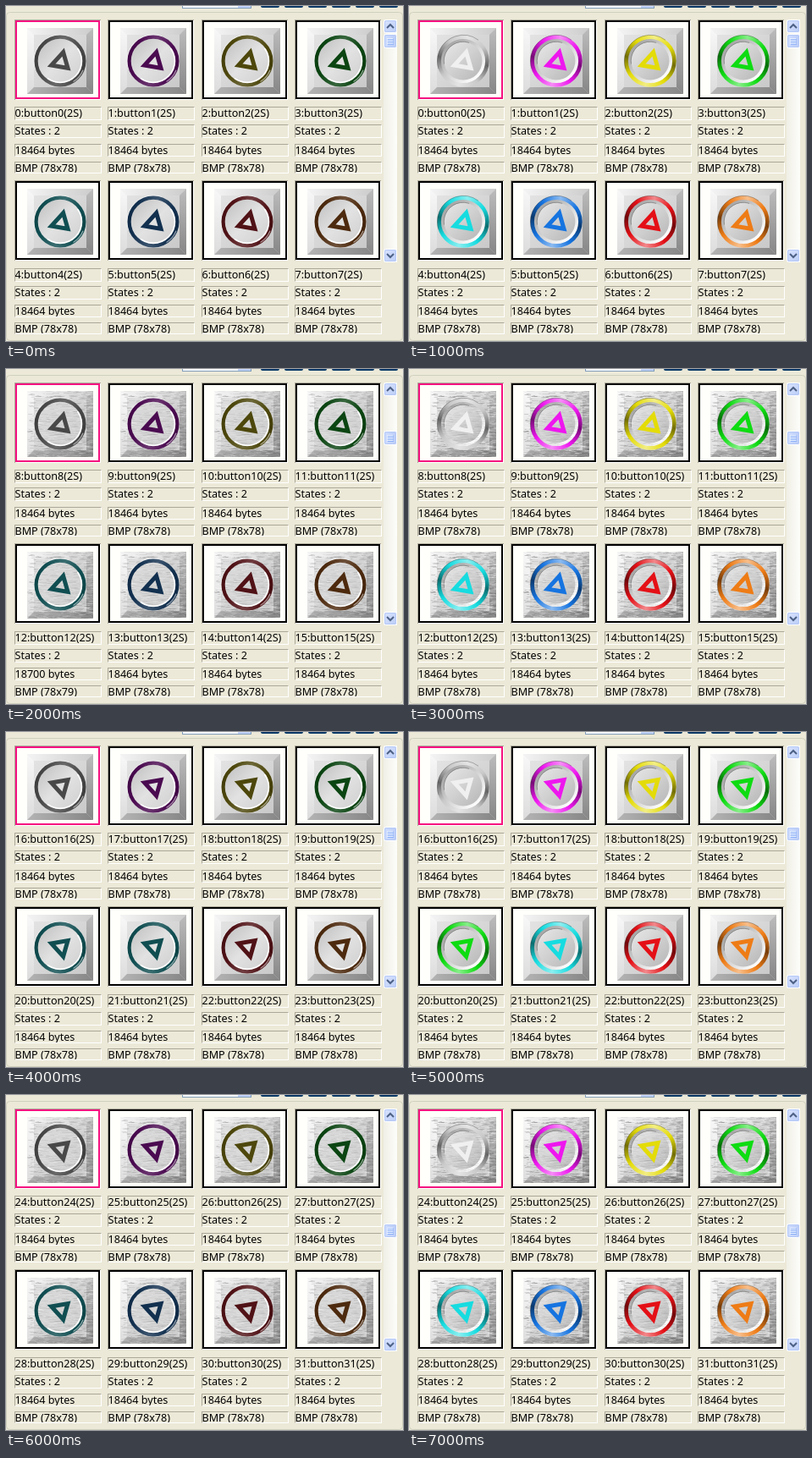
Animation, 469 px wide and 396 px high, one loop 8000 ms. Source, as an HTML page with a canvas:

```html
<!DOCTYPE html>
<html lang="en">
<head>
<meta charset="utf-8">
<title>Button list</title>
<style>
html, body { margin: 0; width: 100%; height: 100%; overflow: hidden; background: #ece9d8; }
#stage { position: relative; width: 469px; height: 396px; overflow: hidden; }
canvas { position: absolute; left: 0; top: 0; }
.label {
  position: absolute; box-sizing: border-box; width: 103px; overflow: hidden;
  border: 1px solid; border-color: #aca899 #fff #fff #aca899;
  font: 12.6px/14px "Noto Sans", "Open Sans", sans-serif;
  color: #000; white-space: pre; text-indent: -0.5px;
}
</style>
</head>
<body>
<div id="stage"><canvas id="view" width="469" height="396"></canvas></div>
<script>
const stage = document.getElementById('stage');
const g = document.getElementById('view').getContext('2d');
const COLS = [0, 110, 221, 331];
const ROWS = [0, 190];
const LINES = [[119, 16], [140, 16], [163, 15], [184, 14]];
const DARK = ['#484848', '#4a0a50', '#4d470c', '#0b4512', '#104e52', '#12304f', '#501216', '#4d2a0e'];
const LIT = ['#c9c9c9', '#ee16ee', '#e4dc08', '#0edc12', '#16dce0', '#1674e0', '#e41016', '#ee7c16'];
const SIZE = 78, MID = 39;

function rect(x, y, w, h, fill) {
  g.fillStyle = fill;
  g.fillRect(x, y, w, h);
}

function poly(points, fill) {
  g.beginPath();
  points.forEach(([x, y]) => g.lineTo(x, y));
  g.closePath();
  if (fill) { g.fillStyle = fill; g.fill(); }
}

function ramp(x0, y0, x1, y1, ...colors) {
  const r = g.createLinearGradient(x0, y0, x1, y1);
  colors.forEach((c, i) => r.addColorStop(i / (colors.length - 1), c));
  return r;
}

function disc(r, fill) {
  g.beginPath();
  g.arc(MID, MID, r, 0, Math.PI * 2);
  g.fillStyle = fill;
  g.fill();
}

function arc(r, from, to, color, width) {
  g.beginPath();
  g.arc(MID, MID, r, from * Math.PI, to * Math.PI);
  g.strokeStyle = color;
  g.lineWidth = width;
  g.stroke();
}

function round(x, y, w, h, r, fill, stroke) {
  g.beginPath();
  g.roundRect(x, y, w, h, r);
  if (fill) { g.fillStyle = fill; g.fill(); }
  if (stroke) { g.strokeStyle = stroke; g.lineWidth = 1; g.stroke(); }
}

function mix(a, b, t) {
  const part = (c, i) => parseInt(c.slice(i, i + 2), 16);
  return `rgb(${[1, 3, 5].map(i => Math.round(part(a, i) * (1 - t) + part(b, i) * t))})`;
}

// Fine horizontal scratches of brushed metal
function brush(height) {
  let seed = 7;
  const rnd = () => (seed = (seed * 16807) % 2147483647) / 2147483647;
  for (let i = 0; i < 1100; i++) {
    const x = rnd() * SIZE, y = Math.floor(rnd() * height);
    const w = Math.min(1 + rnd() * 9, SIZE - x);
    const tone = rnd() < 0.55 ? '255,255,255' : '100,100,100';
    rect(x, y, w, 1, `rgba(${tone},${0.05 + rnd() * 0.17})`);
  }
}

function plate(metal, height) {
  const e = SIZE, b = height, n = 8;
  rect(0, 0, e, b, metal ? ramp(0, 0, e, b, '#e2e2e2', '#d2d2d2', '#c2c2c2')
                         : ramp(0, 0, e, b, '#e6e6e6', '#d6d6d6', '#c6c6c6'));
  poly([[0, 0], [e, 0], [e - n, n], [n, n]], ramp(0, 0, e, 0, '#f4f4f4', '#cccccc'));
  poly([[0, 0], [n, n], [n, b - n], [0, b]], ramp(0, 0, 0, b, '#f8f8f8', '#dcdcdc'));
  poly([[e, 0], [e, b], [e - n, b - n], [e - n, n]], ramp(0, 0, 0, b, '#bcbcbc', '#868686'));
  poly([[0, b], [n, b - n], [e - n, b - n], [e, b]], ramp(0, 0, e, 0, '#b4b4b4', '#868686'));
  if (metal) brush(b);
}

function ringPaint(color, lit) {
  const c = g.createConicGradient(-0.6, MID, MID);
  const light = mix(color, '#ffffff', lit ? 0.5 : 0.18);
  const deep = mix(color, '#000000', lit ? 0.5 : 0.12);
  [color, deep, color, light, color, deep, color, light, color]
    .forEach((s, i) => c.addColorStop(i / 8, s));
  return c;
}

function button(x, y, color, lit, metal, flip, height) {
  g.save();
  g.translate(x, y);
  plate(metal, height);
  if (lit) {
    disc(26.5, ramp(20, 20, 58, 58, '#a4a4a4', '#d4d4d4', '#ffffff'));
    disc(22.5, ramp(22, 22, 56, 56, '#e2e2e2', '#d0d0d0', '#bcbcbc'));
    arc(22.8, 0.95, 1.6, 'rgba(110,110,110,.6)', 1);
    if (metal) { g.globalAlpha = 0.5; brush(height); g.globalAlpha = 1; }
  } else {
    disc(26.5, metal ? 'rgba(215,215,215,.4)'
                     : ramp(18, 18, 60, 60, '#c6c6c6', '#e2e2e2', '#d2d2d2'));
    arc(25.5, -0.2, 0.7, '#fff', 2);
    arc(31, 0.9, 1.6, 'rgba(255,255,255,.6)', 1);
  }
  arc(28.4, 0, 2, ringPaint(color, lit), lit ? 4.6 : 4.2);
  if (lit) arc(30.6, 0.9, 1.7, 'rgba(60,60,60,.45)', 0.8);
  else arc(29, 0.12, 0.32, 'rgba(255,255,255,.55)', 1.2);
  if (flip) { g.translate(0, SIZE); g.scale(1, -1); }
  poly([[42.6, 28.6], [28.6, 44], [48, 47.4]]);
  g.lineJoin = 'miter';
  g.lineWidth = 5;
  g.strokeStyle = lit && color === LIT[0] ? '#f0f0f0' : color;
  g.stroke();
  g.restore();
}

function chevron(y, dir) {
  round(446.5, y + 0.5, 15, 15, 2, ramp(446, y, 462, y + 16, '#dbe5ff', '#b9cbf6'), '#fff');
  round(447.5, y + 1.5, 13, 13, 2, null, '#b4c8f6');
  g.beginPath();
  g.moveTo(450, y + 8 + 2 * dir);
  g.lineTo(454, y + 8 - 2 * dir);
  g.lineTo(458, y + 8 + 2 * dir);
  g.strokeStyle = '#4d6185';
  g.lineWidth = 2;
  g.stroke();
}

function scrollbar(page) {
  rect(446, 16, 16, 287, ramp(446, 0, 462, 0, '#f0efe6', '#fdfdfa'));
  chevron(16, 1);
  chevron(287, -1);
  const y = 33 + Math.round(page * 39.7);
  round(446.5, y + 0.5, 15, 16, 2, ramp(446, 0, 462, 0, '#d0deff', '#b9cbf6'), '#fff');
  round(447.5, y + 1.5, 13, 14, 2, null, '#b4c8f6');
  for (let i = 0; i < 4; i++) {
    rect(450, y + 5 + i * 2, 7, 1, '#eef4fe');
    rect(451, y + 6 + i * 2, 7, 1, '#8cb0f8');
  }
}

function chrome() {
  rect(0, 0, 469, 396, '#ece9d8');
  rect(208, 0, 82, 3, '#7f9db9');
  rect(209, 0, 80, 2, '#fff');
  rect(274, 0, 15, 2, '#c3d3fb');
  for (let i = 0; i < 6; i++) round(301 + i * 28, -4, 22, 6, 2, '#063a68');
  round(0.5, 7.5, 468, 388, 4, null, '#d0d0bf');
}

function frame(x, y, color) {
  rect(x, y, 102, 95, '#aca899');
  rect(x + 1, y + 1, 101, 94, '#fff');
  rect(x + 1, y + 1, 100, 93, color);
  rect(x + 3, y + 3, 96, 89, '#fffffb');
}

const labels = [];
for (const [r, dy] of ROWS.entries()) {
  for (const dx of COLS) {
    labels.push(LINES.map(([top, h], i) => {
      const el = document.createElement('div');
      el.className = 'label';
      el.style.cssText = `left:${10 + dx}px;top:${top + dy + (r && i < 2 ? 1 : 0)}px;height:${h}px`;
      return stage.appendChild(el);
    }));
  }
}

function render(step) {
  const page = step >> 1, lit = step % 2 === 1;
  chrome();
  for (let i = 0; i < 8; i++) {
    const dx = COLS[i % 4], dy = ROWS[i >> 2], id = page * 8 + i;
    const tall = id === 12 && !lit;
    frame(10 + dx, 16 + dy, i ? '#000' : '#f5117f');
    // The third page repeats teal when dark, and green when lit
    const hue = page === 2 && (i === 4 || i === 5) ? (lit ? i - 1 : 4) : i;
    button(25 + dx, 26 + dy, (lit ? LIT : DARK)[hue], lit, page % 2 === 1, page > 1, tall ? 79 : SIZE);
    [`${id}:button${id}(2S)`, 'States : 2', `${tall ? 18700 : 18464} bytes`, `BMP (78x${tall ? 79 : 78})`]
      .forEach((text, k) => { labels[i][k].textContent = text; });
  }
  scrollbar(page);
}

let shown = -1;
const start = performance.now();
function tick() {
  const step = Math.floor((performance.now() - start) / 1000) % 8;
  if (step !== shown) render(shown = step);
  requestAnimationFrame(tick);
}
tick();
</script>
</body>
</html>
```
